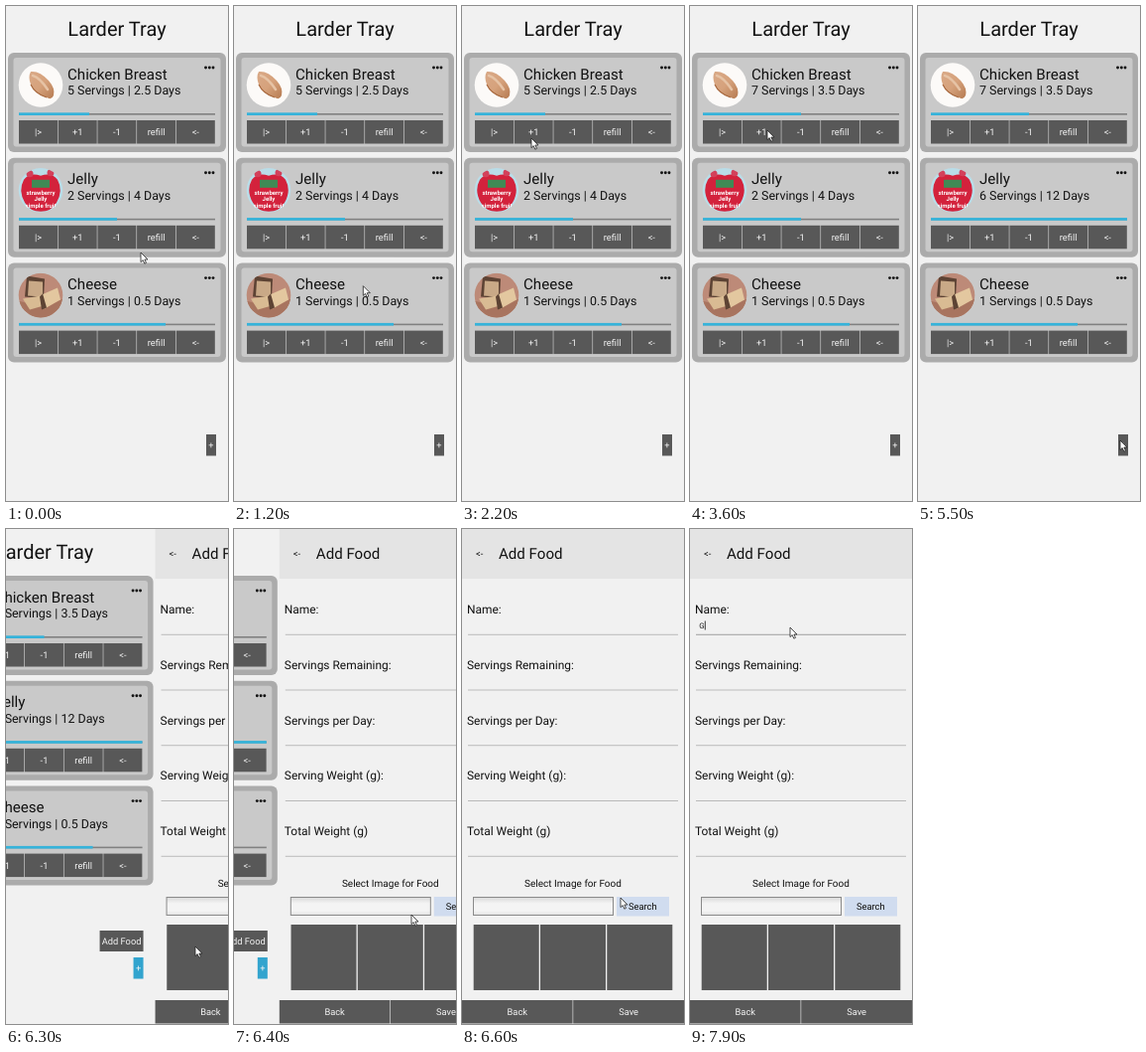
An HTML page for the animation above (8000 ms loop, 224 px wide and 498 px high).

```html
<!DOCTYPE html>
<html lang="en">
<head>
<meta charset="utf-8">
<title>Larder Tray</title>
<style>
  html, body { margin: 0; width: 100%; height: 100%; overflow: hidden; background: #f1f1f1; }
  svg { display: block; width: 100%; height: 100%; }
  text { font-family: Roboto, Arial, sans-serif; fill: #111; white-space: pre; text-rendering: geometricPrecision; }
</style>
</head>
<body>
<svg id="stage" viewBox="0 0 224 498">
  <defs>
    <clipPath id="disc"><circle cx="35" cy="32.5" r="22.3"/></clipPath>
    <linearGradient id="field" x2="0" y2="1">
      <stop offset="0" stop-color="#d9d9d9"/>
      <stop offset=".35" stop-color="#f4f4f4"/>
      <stop offset=".75" stop-color="#f4f4f4"/>
      <stop offset="1" stop-color="#e2e2e2"/>
    </linearGradient>
    <linearGradient id="meat" x2="1" y2="1">
      <stop offset="0" stop-color="#d9a987"/>
      <stop offset=".5" stop-color="#d6a27c"/>
      <stop offset="1" stop-color="#b67b52"/>
    </linearGradient>
  </defs>
  <g id="list"></g>
  <g id="form"></g>
  <path id="cursor" d="M0 0V9.6L2.2 7.6L3.8 11.2L5.5 10.4L3.9 7H7Z" fill="#fff" stroke="#222" stroke-width=".8" stroke-linejoin="round"/>
</svg>
<script>
const LOOP = 8000, TICK = 100, WIDTH = 224;
const DARK = '#585858', BLUE = '#35b3da';
const $ = id => document.getElementById(id);

const rect = (x, y, w, h, fill, extra = '') =>
  `<rect x="${x}" y="${y}" width="${w}" height="${h}" fill="${fill}" ${extra}/>`;
const label = (x, y, size, text, extra = '') =>
  `<text x="${x}" y="${y}" font-size="${size}" ${extra}>${text.replace('<', '&lt;').replace('>', '&gt;')}</text>`;
const centred = 'text-anchor="middle"';
const button = (x, y, w, h, text, extra = '') =>
  rect(x, y, w, h, DARK, extra) +
  label(x + w / 2, y + h / 2 + 3.2, 9.3, text, `${centred} style="fill:#f4f4f4"`);
const print = (y, text) => label(35, y, 6, text, `${centred} font-weight="700" style="fill:#fff"`);

const photos = [
  // chicken
  `${rect(12, 10, 46, 45, '#fcfaf8')}
   <path d="M25 19Q34 18 43 28Q50 36 48 43Q46 48 41 45Q29 41 25 32Q22 24 25 19Z" fill="url(#meat)"/>
   <path d="M27 23Q34 25 42 37" fill="none" stroke="#e6c3a5" stroke-width="2.5" stroke-linecap="round"/>
   <path d="M25 32Q29 41 41 45" fill="none" stroke="#a8693f" stroke-width="1.2"/>`,
  // jelly
  `${rect(12, 10, 46, 45, '#b9dde8')}
   <path d="M18 22Q24 14 35 18Q46 14 52 22Q58 33 51 45Q46 54 35 54Q24 54 19 45Q12 33 18 22Z" fill="#d3223c"/>
   <circle cx="24" cy="16" r="3.5" fill="#d3405a"/><circle cx="45" cy="15" r="3.5" fill="#d3405a"/>
   ${rect(26, 22, 18, 8, '#3f8a55')}
   ${print(37.5, 'strawberry')}${print(43.5, 'Jelly')}${print(50, 'simple fruit')}`,
  // cheese
  `${rect(12, 10, 46, 45, '#bd8a78')}
   <path d="M12 38L36 44L58 36V56H12Z" fill="#a8745f"/>
   <path d="M21 13L39 16L38 36L19 34Z" fill="#5d4334"/>
   <path d="M23 18L37 19V34L22 33Z" fill="#c9a987"/>
   <path d="M17 36L35 33L38 43L24 47Z" fill="#d9bb93"/>
   <path d="M36 32L52 25L55 37L39 46Z" fill="#e3c79f"/>
   <path d="M34 34L37 31L41 45L36 47Z" fill="#5d4334"/>`
];

const card = (name, i) => `<g transform="translate(0 ${47 + 105.8 * i})">
  ${rect(2, 0, 220, 100, '#ababab', 'rx="6"')}
  ${rect(7.5, 5, 209, 89.5, '#c9c9c9', 'rx="3"')}
  <g clip-path="url(#disc)">${photos[i]}</g>
  ${label(62, 26.5, 15.1, name)}
  ${label(62, 42, 12.45, '', `id="info${i}"`)}
  ${[201.5, 205.3, 209].map(x => `<circle cx="${x}" cy="15" r="1.45" fill="#111"/>`).join('')}
  ${rect(13, 61, 198, 1.6, '#808080')}
  ${rect(13, 60.3, 0, 2.7, BLUE, `id="bar${i}"`)}
  ${['|>', '+1', '-1', 'refill', '<-'].map((s, k) => button(13 + 39.7 * k, 68, 39, 23.5, s)).join('')}
</g>`;

$('list').innerHTML =
  label(112, 30, 20, 'Larder Tray', centred) +
  ['Chicken Breast', 'Jelly', 'Cheese'].map(card).join('') +
  `<g id="popup">${button(168, 404, 44, 21, 'Add Food')}</g>` +
  button(202, 431, 10, 21.5, '+', 'id="plus"');

const fields = ['Name:', 'Servings Remaining:', 'Servings per Day:', 'Serving Weight (g):', 'Total Weight (g)'];
$('form').innerHTML =
  rect(0, 0, WIDTH, 498, '#f1f1f1') + rect(0, 0, WIDTH, 50, '#e4e4e4') +
  label(14, 27.5, 9.3, '<-') + label(37, 29.5, 15.1, 'Add Food') +
  fields.map((s, i) => label(5, 85.2 + 55.75 * i, 11.95, s) +
    rect(6, 105.8 + 55.75 * i, 212, .9, '#b4b4b4', `id="line${i}"`)).join('') +
  label(9.3, 100.3, 7.6, 'G', 'id="typed"') +
  rect(10, 92.5, .9, 9, '#222', 'id="caret"') +
  label(112, 360, 10, 'Select Image for Food', centred) +
  rect(11.5, 370.5, 141, 18, 'url(#field)', 'stroke="#8a8a8a"') +
  rect(156, 370, 53, 19.5, '#d0dcef') +
  label(182.3, 383, 9.4, 'Search', centred) +
  [11.7, 79, 146.3].map(x => rect(x, 398, 66, 66, DARK)).join('') +
  button(0, 474, 111.6, 23.5, 'Back') + button(112.2, 474, 111.8, 23.5, 'Save');

// time, x, y of the pointer tip
const pointer = [
  [0, 136, 248], [100, 136, 222], [300, 136, 222], [400, 159, 262], [500, 33, 314], [600, 94, 310],
  [900, 94, 310], [1000, 112, 337], [1100, 135, 318], [1400, 121, 209], [1500, 121, 209],
  [1800, 100, 170], [2200, 70, 133], [2500, 70, 133], [2800, 78, 125], [3600, 78, 125],
  [4100, 162, 240], [4800, 162, 240], [5100, 176, 320], [5500, 204, 437], [5700, 206, 443],
  [5900, 204, 438], [6200, 191, 420], [6300, 191, 420], [6400, 179, 388], [6600, 160, 371],
  [6900, 124, 190], [7100, 101, 99]
];
// time, card, text, bar length
const stock = [
  [0, 0, '5 Servings | 2.5 Days', 71], [0, 1, '2 Servings | 4 Days', 99], [0, 2, '1 Servings | 0.5 Days', 148],
  [2900, 0, '6 Servings | 3 Days', 85], [3300, 0, '7 Servings | 3.5 Days', 99],
  [4400, 1, '6 Servings | 12 Days', 198]
];
const SLIDE_START = 6251, SLIDE_TIME = 272;

function pointerAt(t) {
  const next = pointer.findIndex(k => k[0] > t);
  if (next < 0) return pointer[pointer.length - 1].slice(1);
  const [a, b] = [pointer[next - 1], pointer[next]];
  const p = (t - a[0]) / (b[0] - a[0]);
  return [1, 2].map(i => a[i] + (b[i] - a[i]) * p);
}
const show = (id, on) => $(id).setAttribute('visibility', on ? 'visible' : 'hidden');

function draw(t) {
  for (const [time, i, text, length] of stock) {
    if (t < time) continue;
    $('info' + i).textContent = text;
    $('bar' + i).setAttribute('width', length);
  }
  const open = t >= 5800;
  show('popup', open);
  $('plus').setAttribute('fill', open ? '#32a4ce' : DARK);

  const p = Math.min(1, Math.max(0, (t - SLIDE_START) / SLIDE_TIME));
  const shift = WIDTH * (1 - (1 - p) ** 2);
  $('list').setAttribute('transform', `translate(${-shift})`);
  $('form').setAttribute('transform', `translate(${WIDTH - shift})`);

  const typed = t >= 7900;
  show('typed', typed);
  show('caret', t >= 7100 && !(t >= 7400 && t < 7700));
  $('caret').setAttribute('x', typed ? 14.8 : 9.6);
  $('line0').setAttribute('fill', t >= 7100 ? '#969696' : '#b4b4b4');
  $('cursor').setAttribute('transform', `translate(${pointerAt(t)})`);
}

const start = performance.now();
function frame() {
  const t = (performance.now() - start) % LOOP;
  draw(Math.floor(t / TICK) * TICK);
  requestAnimationFrame(frame);
}
frame();
</script>
</body>
</html>
```
